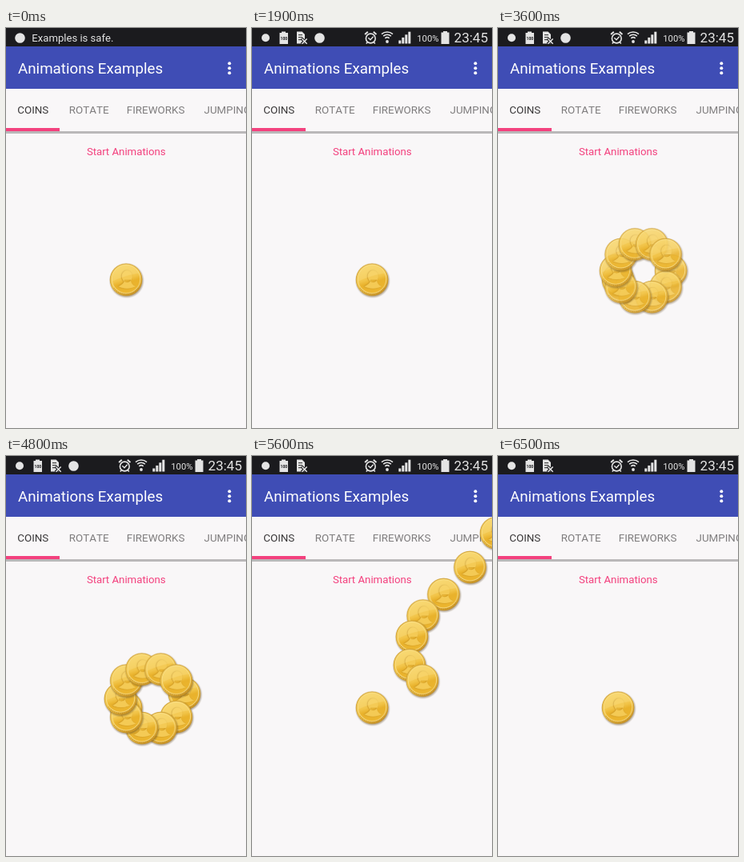
Write an HTML page with a canvas that moves like this. It is 300 by 500 pixels and loops after 6600 ms.

```html
<!DOCTYPE html>
<html lang="en">
<head>
<meta charset="utf-8">
<title>Animations Examples</title>
<style>
  html, body { margin: 0; width: 100%; height: 100%; overflow: hidden; background: #f9f7f8; }
  canvas { display: block; width: 300px; height: 500px; }
</style>
</head>
<body>
<canvas id="stage"></canvas>
<script>
const W = 300, H = 500, LOOP = 6600, STEP = 100;
const BAR = 23;
const COINS = 10, COIN_R = 20.3;
const HOME = { x: 150.1, y: 314.6 };
const RING = { x: 181.6, y: 303.3, r: 38.6 };
const EXIT = { x: 332, y: 48 };
const ICON = '#e4e4e4', BAR_COLOR = '#1b1b1e', PINK = '#f3417e';

const canvas = document.getElementById('stage');
const ctx = canvas.getContext('2d');
const dpr = window.devicePixelRatio || 1;
canvas.width = W * dpr;
canvas.height = H * dpr;

const clamp = v => Math.max(0, Math.min(1, v));
const ease = u => (1 - Math.cos(Math.PI * clamp(u))) / 2;
const span = (t, start, length) => clamp((t - start) / length);

function rect(x, y, w, h, color) {
  ctx.fillStyle = color;
  ctx.fillRect(x, y, w, h);
}

function disc(g, x, y, r, fill) {
  g.fillStyle = fill;
  g.beginPath();
  g.arc(x, y, r, 0, Math.PI * 2);
  g.fill();
}

function ring(g, x, y, r, width, color, from = 0, to = Math.PI * 2) {
  g.strokeStyle = color;
  g.lineWidth = width;
  g.beginPath();
  g.arc(x, y, r, from, to);
  g.stroke();
}

function poly(points, color) {
  ctx.fillStyle = color;
  ctx.beginPath();
  points.forEach(([x, y]) => ctx.lineTo(x, y));
  ctx.closePath();
  ctx.fill();
}

function line(points, width, color) {
  ctx.strokeStyle = color;
  ctx.lineWidth = width;
  ctx.beginPath();
  points.forEach(([x, y], i) => i ? ctx.lineTo(x, y) : ctx.moveTo(x, y));
  ctx.stroke();
}

function label(str, x, y, size, color, weight = 400) {
  ctx.font = `${weight} ${size}px Roboto, sans-serif`;
  ctx.fontKerning = 'none';
  ctx.fillStyle = color;
  ctx.fillText(str, x, y);
}

// Coin sprite, drawn once and reused
const SPRITE = 50, SCALE = 2 * dpr;

function makeCoin() {
  const c = document.createElement('canvas');
  c.width = c.height = SPRITE * SCALE;
  const g = c.getContext('2d');
  g.scale(SCALE, SCALE);
  g.translate(SPRITE / 2, SPRITE / 2);

  const shade = g.createRadialGradient(0.7, 1.2, COIN_R - 2, 0.7, 1.2, COIN_R + 1.8);
  shade.addColorStop(0, 'rgba(90,65,25,.6)');
  shade.addColorStop(1, 'rgba(90,65,25,0)');
  disc(g, 0.7, 1.2, COIN_R + 1.8, shade);

  const rim = g.createLinearGradient(-12, -16, 10, 18);
  rim.addColorStop(0, '#ecc250');
  rim.addColorStop(0.5, '#f0c54e');
  rim.addColorStop(1, '#d09a28');
  disc(g, 0, 0, COIN_R, rim);
  ring(g, 0, 0, COIN_R - 0.4, 0.7, 'rgba(165,115,25,.45)');

  const face = g.createLinearGradient(-5, -17, 5, 17);
  face.addColorStop(0, '#f5d061');
  face.addColorStop(0.45, '#f2c54a');
  face.addColorStop(0.6, '#e9b22c');
  face.addColorStop(1, '#ecb630');
  disc(g, 0, -0.8, COIN_R - 2.6, face);
  ring(g, 0, -0.8, COIN_R - 2.6, 0.9, 'rgba(255,236,160,.7)');

  // small ridges along the lower edge
  for (let i = 0; i < 15; i++) {
    const a = Math.PI * (0.2 + 0.6 * i / 14);
    disc(g, Math.cos(a) * 18.4, Math.sin(a) * 18.2, 0.55, '#b07f20');
  }

  // plain bust, raised from the face
  g.beginPath();
  g.ellipse(1.2, -4.2, 6.6, 7.4, 0, 0, Math.PI * 2);
  g.moveTo(-2, 0);
  g.quadraticCurveTo(-2, 5, -10, 8.5);
  g.quadraticCurveTo(1, 13.5, 12, 8.5);
  g.quadraticCurveTo(6, 6, 6, 0);
  g.closePath();
  g.shadowColor = 'rgba(165,110,10,.75)';
  g.shadowBlur = 1.5 * SCALE;
  g.shadowOffsetX = -0.5 * SCALE;
  g.fillStyle = '#f4ca55';
  g.fill('nonzero');
  g.shadowColor = 'transparent';

  // gloss on the upper half
  g.beginPath();
  g.arc(0, -0.8, COIN_R - 3.2, Math.PI * 0.93, Math.PI * 1.87);
  g.quadraticCurveTo(3, -7, -17, 2);
  g.fillStyle = 'rgba(255,240,175,.22)';
  g.fill();
  return c;
}

const coin = makeCoin();

function drawCoin(x, y, alpha = 1) {
  ctx.globalAlpha = alpha;
  ctx.drawImage(coin, x - SPRITE / 2, y - SPRITE / 2, SPRITE, SPRITE);
  ctx.globalAlpha = 1;
}

function drawRing(t, open) {
  for (let i = 0; i < COINS; i++) {
    const a = i * Math.PI * 2 / COINS;
    const x = RING.x + RING.r * open * Math.cos(a);
    const y = RING.y + RING.r * open * Math.sin(a);
    const go = span(t, 4785 + i * 100, 617);
    if (go < 1) drawCoin(x + (EXIT.x - x) * go, y + (EXIT.y - y) * go, open);
  }
}

// The resting coin stays in front until the ring has formed
function drawCoins(t) {
  const open = ease(span(t, 3035, 715));
  const front = open < 0.5;
  if (!front) drawCoin(HOME.x, HOME.y);
  if (open > 0) drawRing(t, open);
  if (front) drawCoin(HOME.x, HOME.y);
}

function drawIcons(t) {
  disc(ctx, 17, 12.3, 5, ICON);

  // full battery with reading
  rect(37, 4.5, 5, 2, ICON);
  rect(34.5, 6, 10.5, 14, ICON);
  label('100', 35.4, 15.3, 5.2, BAR_COLOR, 700);

  // card with a cross
  poly([[56, 4.5], [62.5, 4.5], [66, 8], [66, 19.5], [56, 19.5]], ICON);
  for (let y = 8; y < 15; y += 3) rect(58, y, 5, 1.2, '#444');
  line([[62, 13], [69, 20]], 3.6, BAR_COLOR);
  line([[69, 13], [62, 20]], 3.6, BAR_COLOR);
  line([[62.5, 13.5], [68.7, 19.7]], 1.6, ICON);
  line([[68.7, 13.5], [62.5, 19.7]], 1.6, ICON);

  if (t < 5000) disc(ctx, 84.5, 12.5, 6.3, ICON);

  // alarm clock
  ring(ctx, 148.3, 13, 5.9, 1.6, ICON);
  line([[141.1, 8], [144.8, 4.8]], 1.9, ICON);
  line([[155.5, 8], [151.8, 4.8]], 1.9, ICON);
  line([[144.5, 17.6], [142.8, 19.6]], 1.6, ICON);
  line([[152.1, 17.6], [153.8, 19.6]], 1.6, ICON);
  line([[145.3, 12.2], [148, 14.8], [151.6, 10.8]], 1.4, ICON);

  // wireless arcs
  for (const r of [4.2, 7.6, 11]) {
    ring(ctx, 169, 16, r, 1.6, ICON, -Math.PI * 0.72, -Math.PI * 0.28);
  }
  disc(ctx, 169, 17, 1.9, ICON);

  // signal bars
  for (let i = 0; i < 4; i++) {
    const h = 4 + i * 3.6;
    rect(183.3 + i * 4, 19.5 - h, 3, h, ICON);
  }

  label('100%', 206.3, 16.8, 11.25, ICON);
  rect(239, 4, 5, 2, ICON);
  rect(236.5, 5.5, 10, 14.5, ICON);
  label('23:45', 252.6, 18, 17, ICON);
}

function drawTicker() {
  disc(ctx, 17.5, 12.5, 6.3, ICON);
  label('Examples is safe.', 32.3, 17, 13.125, ICON);
}

function slide(dy, alpha, draw) {
  if (alpha <= 0) return;
  ctx.save();
  ctx.globalAlpha = alpha;
  ctx.translate(0, dy);
  draw();
  ctx.restore();
}

function drawStatus(t) {
  ctx.save();
  ctx.beginPath();
  ctx.rect(0, 0, W, BAR);
  ctx.clip();
  rect(0, 0, W, BAR, BAR_COLOR);
  const p = ease(span(t, 1370, 460));
  slide(p * BAR, 1 - p, drawTicker);
  slide((p - 1) * BAR, p, () => drawIcons(t));
  ctx.restore();
}

function drawPage() {
  rect(0, 0, W, H, '#f9f7f8');
  rect(0, BAR, W, 76 - BAR, '#3f4db5');
  label('Animations Examples', 15, 56.7, 18.75, '#fff');
  for (let i = 0; i < 3; i++) disc(ctx, 279.3, 44.2 + i * 6, 2, '#fff');

  const grey = '#7f7d7e', tabs = { COINS: 14.2, ROTATE: 78.8, FIREWORKS: 150.8, JUMPING: 247.5 };
  for (const [name, x] of Object.entries(tabs)) {
    label(name, x, 107.4, 13.4, name === 'COINS' ? '#3b393a' : grey);
  }
  rect(0, 125, 67, 4, PINK);
  rect(0, 129, W, 3, '#bab8b9');

  ctx.textAlign = 'center';
  label('Start Animations', 150.3, 159.2, 13.25, PINK);
  ctx.textAlign = 'left';
}

function draw(t) {
  ctx.setTransform(dpr, 0, 0, dpr, 0, 0);
  ctx.imageSmoothingQuality = 'high';
  drawPage();
  drawCoins(t);
  drawStatus(t);
}

let start;
function loop(now) {
  if (start === undefined) start = now;
  draw(Math.floor((now - start) % LOOP / STEP) * STEP);
  requestAnimationFrame(loop);
}
requestAnimationFrame(loop);
</script>
</body>
</html>
```
